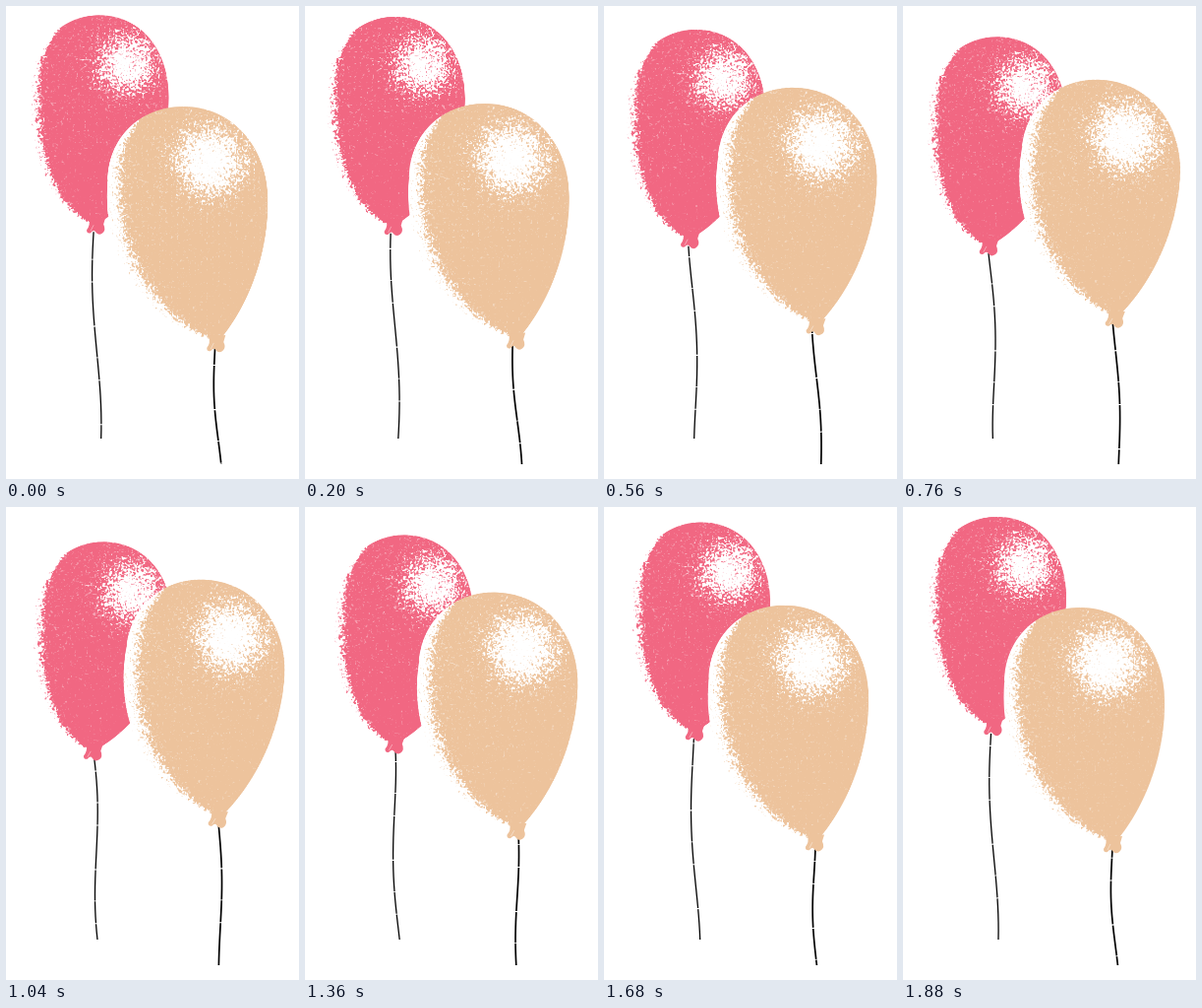
Write an HTML page with a canvas that moves like this. It is 298x480 px and loops after 1.92 s.

```html
<!DOCTYPE html>
<html lang="en">
<head>
<meta charset="utf-8">
<title>Balloons</title>
<style>
  html, body { margin: 0; width: 100%; height: 100%; overflow: hidden; background: #fff; }
  canvas { display: block; width: 298px; height: 480px; }
</style>
</head>
<body>
<canvas id="stage" width="298" height="480"></canvas>
<script>
const LOOP = 1920, STEP = 40, SCALE = 2;
const KNOT = new Path2D('M-7-5Q-5 2-9 7Q-9 11-5 10Q-2 6 0 9Q3 13 7 10Q11 7 8 1L10-6Z');
const SLIT = new Path2D('M-2 2L-5 8');
const ctx = document.getElementById('stage').getContext('2d');

const wave = (t, peak) => Math.cos(2 * Math.PI * (t - peak) / LOOP);
const swell = (t, peak, power = 1) => ((1 + wave(t, peak)) / 2) ** power;

// left: curve from neck to widest point; crown: on from there to the top.
const pink = {
  rgb: [241, 103, 130],
  box: { x: 18, y: 4, w: 150, h: 220 },
  pivot: { x: 90, y: 220 },
  right: 'M92 9C135 9 163 45 163 92C163 150 130 195 98 217L82 219',
  left: [82, 219, 40, 202, 19, 142, 23, 85],
  crown: [23, 85, 23, 42, 52, 9, 92, 9],
  shine: { x: 119, y: 58, r: 26 },
  spray: 8,
  seed: 3,
  dx: t => -0.5 - 2.5 * wave(t, 700),
  dy: t => 26 * swell(t, 1015, 0.92),
  tilt: t => 3.5 * swell(t, 1140, 0.7),
  string: { top: 229, end: 439, x: 89, drift: 5.5, amp: 3.2, belly: -0.6, peak: 1450, lag: 1700, width: 1.3 }
};
const peach = {
  rgb: [237, 195, 156],
  box: { x: 96, y: 97, w: 174, h: 246 },
  pivot: { x: 213, y: 340 },
  right: 'M180 102C232 102 266 146 266 196C267 252 246 304 218 338L208 338',
  left: [208, 338, 150, 326, 96, 262, 103, 178],
  crown: [103, 178, 103, 135, 135, 102, 180, 102],
  shine: { x: 207, y: 157, r: 33 },
  spray: 14,
  seed: 11,
  dx: t => 2.4 * swell(t, 920, 0.4),
  dy: t => -27 * swell(t, 920, 1.2),
  tilt: t => 6 * swell(t, 960),
  string: { top: 347, end: 465, x: 214, drift: 4, amp: 3.2, belly: 1, peak: 1300, lag: 900, width: 1.7 }
};

function hash(x, y, seed) {
  let h = Math.imul(x, 374761393) + Math.imul(y, 668265263) + Math.imul(seed, 974634777);
  h = Math.imul(h ^ (h >>> 13), 1274126177);
  return ((h ^ (h >>> 16)) >>> 0) / 4294967296;
}

function grain(x, y, seed) {
  const i = Math.floor(x), j = Math.floor(y), u = x - i, v = y - j;
  const a = hash(i, j, seed), b = hash(i + 1, j, seed);
  const c = hash(i, j + 1, seed), d = hash(i + 1, j + 1, seed);
  return (a + (b - a) * u) * (1 - v) + (c + (d - c) * u) * v;
}

function bezier(a, b, c, d, t) {
  const s = 1 - t;
  return s * s * s * a + 3 * s * s * t * b + 3 * s * t * t * c + t * t * t * d;
}

const clamp = v => Math.max(0, Math.min(1, v));
const falloff = (d, middle, soft) => 1 / (1 + Math.exp((d - middle) / soft));

// Points along the shaded side, each with the reach of the spray there.
function shadedSide({ left, crown, spray }) {
  const count = 44, end = 1.6;
  return Array.from({ length: count }, (_, i) => {
    const s = end * i / (count - 1);
    const c = s <= 1 ? left : crown, t = s <= 1 ? s : s - 1;
    return {
      x: bezier(c[0], c[2], c[4], c[6], t),
      y: bezier(c[1], c[3], c[5], c[7], t),
      reach: spray * (0.12 + 0.88 * Math.sin(Math.PI * s / end))
    };
  });
}

// Paint the stippled balloon once; white grain stays opaque.
function paint(b) {
  const { box, shine } = b;
  const cv = document.createElement('canvas');
  cv.width = box.w * SCALE;
  cv.height = box.h * SCALE;
  const g = cv.getContext('2d');
  const img = g.createImageData(cv.width, cv.height);
  const side = shadedSide(b);
  for (let py = 0, k = 0; py < cv.height; py++) {
    for (let px = 0; px < cv.width; px++, k += 4) {
      const x = box.x + px / SCALE, y = box.y + py / SCALE;
      let near = 99;
      for (const p of side) {
        near = Math.min(near, Math.sqrt((x - p.x) ** 2 + (y - p.y) ** 2) / p.reach);
      }
      const d = Math.hypot(x - shine.x, y - shine.y);
      const spray = 1 - (1 - falloff(d, shine.r, 10)) * (1 - falloff(near, 1, 0.33));
      const dust = 0.14 + 0.25 * Math.exp(-d / 60) + 0.2 * Math.exp(-near / 2);
      const white = clamp((spray - grain(x / 1.2, y / 1.2, b.seed)) * 5 + 0.4);
      const pale = 0.4 * clamp((dust - grain(x / 1.2, y / 1.2, b.seed + 1)) * 6);
      const a = Math.max(white, pale);
      for (let c = 0; c < 3; c++) img.data[k + c] = b.rgb[c] + (255 - b.rgb[c]) * a;
      img.data[k + 3] = 255;
    }
  }
  g.putImageData(img, 0, 0);
  g.scale(SCALE, SCALE);
  g.translate(-box.x, -box.y);
  g.globalCompositeOperation = 'destination-in';
  g.fill(new Path2D(`${b.right}C${b.left.slice(2)}C${b.crown.slice(2)}Z`));
  b.skin = cv;
}

// A wave runs along the string, later at the top than at the end.
function drawString({ string: s, seed, dy }, t) {
  const top = s.top + dy(t), points = 24;
  ctx.beginPath();
  for (let i = 0; i <= points; i++) {
    const u = i / points;
    const amp = s.amp + s.belly * Math.sin(Math.PI * u);
    ctx.lineTo(s.x + s.drift * u + amp * wave(t, s.peak - s.lag * u), top + (s.end - top) * u);
  }
  ctx.strokeStyle = '#000';
  ctx.lineWidth = s.width;
  ctx.setLineDash([22, 1, 44, 1.2, 31, 0.8]);
  ctx.lineDashOffset = hash(t / STEP, 1, seed) * 100;
  ctx.stroke();
}

function drawBalloon(b, t) {
  const { box, pivot } = b;
  drawString(b, t);
  ctx.save();
  ctx.translate(pivot.x + b.dx(t), pivot.y + b.dy(t));
  ctx.rotate(b.tilt(t) * Math.PI / 180);
  ctx.drawImage(b.skin, box.x - pivot.x, box.y - pivot.y, box.w, box.h);
  ctx.fillStyle = `rgb(${b.rgb})`;
  ctx.fill(KNOT);
  ctx.setLineDash([]);
  ctx.strokeStyle = 'rgba(255,255,255,.5)';
  ctx.lineWidth = 0.8;
  ctx.stroke(SLIT);
  ctx.restore();
}

function draw(elapsed) {
  const t = Math.floor((elapsed % LOOP) / STEP) * STEP;
  ctx.fillStyle = '#fff';
  ctx.fillRect(0, 0, 298, 480);
  drawBalloon(pink, t);
  drawBalloon(peach, t);
}

paint(pink);
paint(peach);
let start;
function frame(now) {
  start ??= now;
  draw(Math.max(0, now - start));
  requestAnimationFrame(frame);
}
draw(0);
requestAnimationFrame(frame);
</script>
</body>
</html>
```
